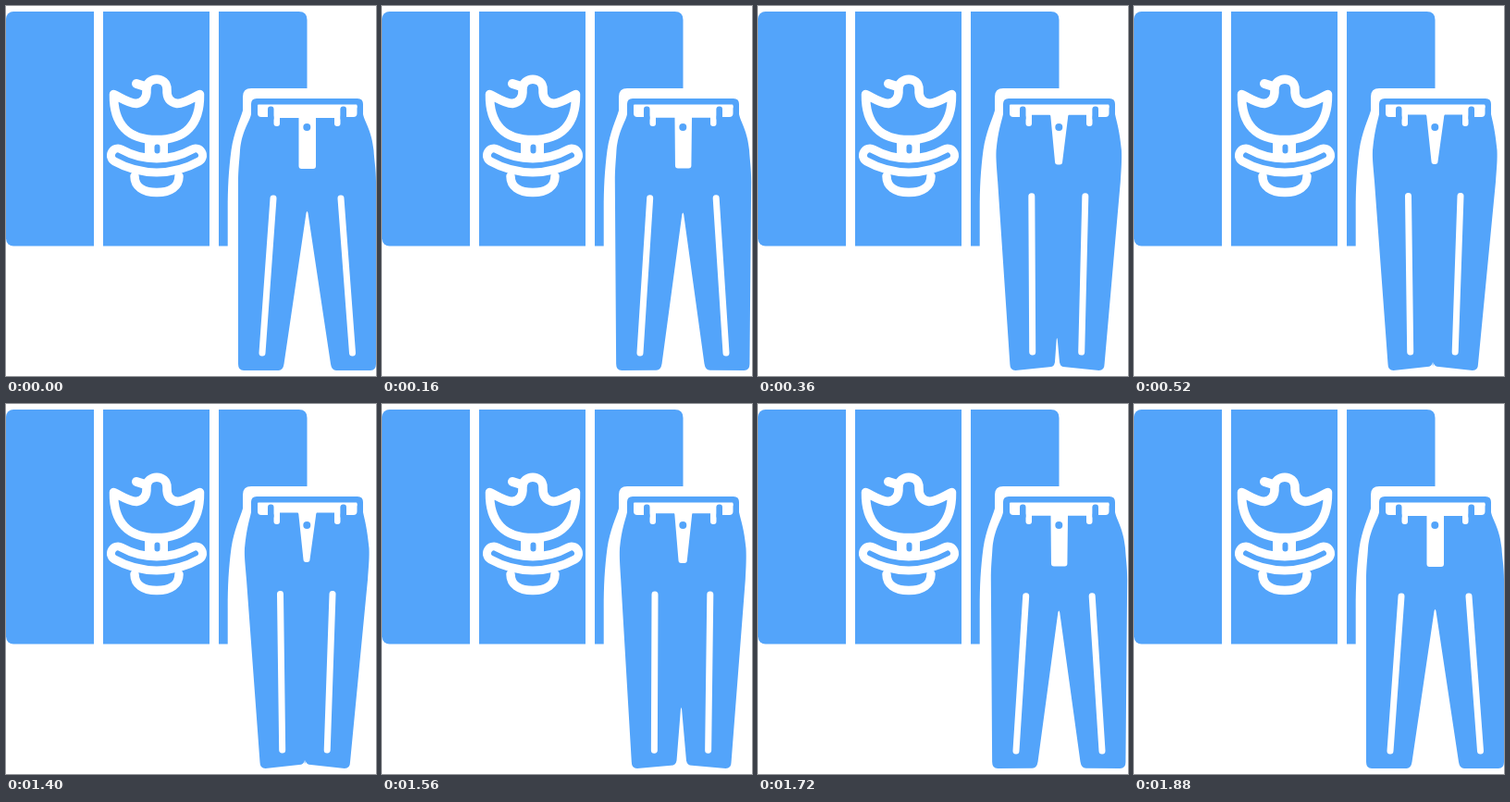
These frames come from a looping animation (400 px wide and 400 px high, 2.64 s). An HTML page with a canvas:

```html
<!DOCTYPE html>
<html lang="en">
<head>
<meta charset="utf-8">
<title>Flag and trousers</title>
<style>
  html, body { margin: 0; width: 100%; height: 100%; overflow: hidden; background: #fff; }
  canvas { display: block; width: 400px; height: 400px; }
</style>
</head>
<body>
<canvas id="stage" width="400" height="400"></canvas>
<script>
const ctx = document.getElementById('stage').getContext('2d');
const BLUE = '#53a4fa', WHITE = '#fff';
const LOOP = 2640, STEP = 40, MOVE = 520, BACK = 1360, POWER = 3.5;

const ease = u => {
  u = Math.min(1, Math.max(0, u));
  return u < 0.5 ? (2 * u) ** POWER / 2 : 1 - (2 - 2 * u) ** POWER / 2;
};

function fill(d, color) {
  ctx.fillStyle = color;
  ctx.fill(new Path2D(d));
}

function stroke(d, width, color) {
  ctx.strokeStyle = color;
  ctx.lineWidth = width;
  ctx.lineCap = ctx.lineJoin = 'round';
  ctx.stroke(new Path2D(d));
}

function rect(x, y, w, h, r, color) {
  ctx.fillStyle = color;
  ctx.beginPath();
  ctx.roundRect(x, y, w, h, r);
  ctx.fill();
}

function drawFlag() {
  rect(0, 6, 95, 253.5, [8, 0, 0, 8], BLUE);
  rect(105, 6, 115, 253.5, 0, BLUE);
  fill('M230 6H316.500Q325.500 6 325.500 15V89H265Q256 89 256 98V113' +
       'C253 123 246.500 136 243.500 156C240.700 177 239.700 197 239.700 220V259.500H230Z', BLUE);
}

function drawEmblem() {
  // bird
  stroke('M116.500 95.500C124 99 132 105 141 105.500C149 104 152.500 99 152 90' +
         'C152 75.500 174 75.500 174 90C173.500 99 177 104 185 105.500' +
         'C194 105 202 99 209.500 95.500C210 128 194 144.500 163 144.500' +
         'C132 144.500 116 128 116.500 95.500Z', 9.5, WHITE);
  stroke('M141 84L149 86.500', 10, WHITE);
  // legs
  rect(150, 146, 25, 17, 0, WHITE);
  rect(160.5, 149.5, 6, 10, 3, BLUE);
  // base and wreath
  stroke('M139 184C139 195 148 201.500 163 201.500S187 195 187 184', 9.5, WHITE);
  const arc = 'M121 161.500C147 176 179 176 205 161.500';
  stroke(arc, 24, WHITE);
  stroke(arc, 6, BLUE);
}

function drawTrousers(p) {
  const mix = (a, b) => a + (b - a) * p;
  const hipL = mix(253, 258), hipR = mix(397.5, 392.5);
  const outL = mix(251, 274.5), outR = mix(400, 372);
  const inL = mix(300.5, 323), inR = mix(351, 323.5);
  const crotch = 222 + 166 * p * p;
  const inY = mix(389, 387), hemY = mix(394, 390);

  fill(`M271 100H380Q386 100 386 106V117
    C388 126 ${hipR - 2} 135 ${hipR} 156
    C${hipR + 0.5} 166 ${mix(400, 392)} 176 ${mix(400, 391)} 190
    L${outR} 387Q${outR} 394 ${outR - 6} 394
    L${inR + 6} ${hemY}Q${inR + 1} ${hemY} ${inR} ${inY - 2}
    L${mix(326.5, 323.5)} ${crotch + 2}
    Q${mix(325.5, 323)} ${crotch - 2} ${mix(324.5, 322.5)} ${crotch + 2}
    L${inL} ${inY - 2}Q${inL - 1} ${hemY} ${inL - 6} ${hemY}
    L${outL + 6} 394Q${outL} 394 ${outL} 387
    L${mix(251, 260)} 190C${mix(251, 259)} 176 ${hipL - 0.5} 166 ${hipL} 156
    C${hipL + 2} 135 263 126 265 117V106Q265 100 271 100Z`, BLUE);

  // belt opening with side pockets, pegs and loops
  rect(272, 106.5, 107.5, 4, 1, WHITE);
  rect(272, 108, 18, 12, [0, 0, 2, 4], WHITE);
  rect(361.5, 108, 18, 12, [0, 0, 4, 2], WHITE);
  rect(290, 108, 71, mix(13, 9.5), 0, WHITE);
  rect(289.5, 108, 6.5, 22, [0, 0, 3, 3], WHITE);
  rect(355, 108, 6.5, 22, [0, 0, 3, 3], WHITE);
  rect(283, 108.5, 6.5, 14, [3, 3, 0, 0], BLUE);
  rect(361.5, 108.5, 6.5, 14, [3, 3, 0, 0], BLUE);

  // fly and button
  const flyL = mix(316.5, 321.5), flyR = mix(335, 328.5), flyY = mix(176, 171);
  fill(`M314 116Q316.500 117 316.500 121L${flyL} ${flyY - 3}
    Q${flyL} ${flyY} ${flyL + 3} ${flyY}H${flyR - 3}
    Q${flyR} ${flyY} ${flyR} ${flyY - 3}L335 121Q335 117 337.500 116Z`, WHITE);
  rect(321.3, 127, 8, 8, 4, BLUE);

  // creases
  const top = mix(208, 205.5), end = mix(375, 374);
  stroke(`M${mix(289, 296.5)} ${top}L${mix(277, 298.7)} ${end}`, 7, WHITE);
  stroke(`M${mix(362, 353)} ${top}L${mix(374.5, 347.2)} ${end}`, 7, WHITE);
}

function draw(now) {
  const t = Math.floor((now % LOOP) / STEP) * STEP;
  const p = ease(t / MOVE) - ease((t - BACK) / MOVE);
  ctx.fillStyle = WHITE;
  ctx.fillRect(0, 0, 400, 400);
  drawFlag();
  drawEmblem();
  drawTrousers(p);
}

let start;
function tick(now) {
  start ??= now;
  draw(now - start);
  requestAnimationFrame(tick);
}
draw(0);
requestAnimationFrame(tick);
</script>
</body>
</html>
```
